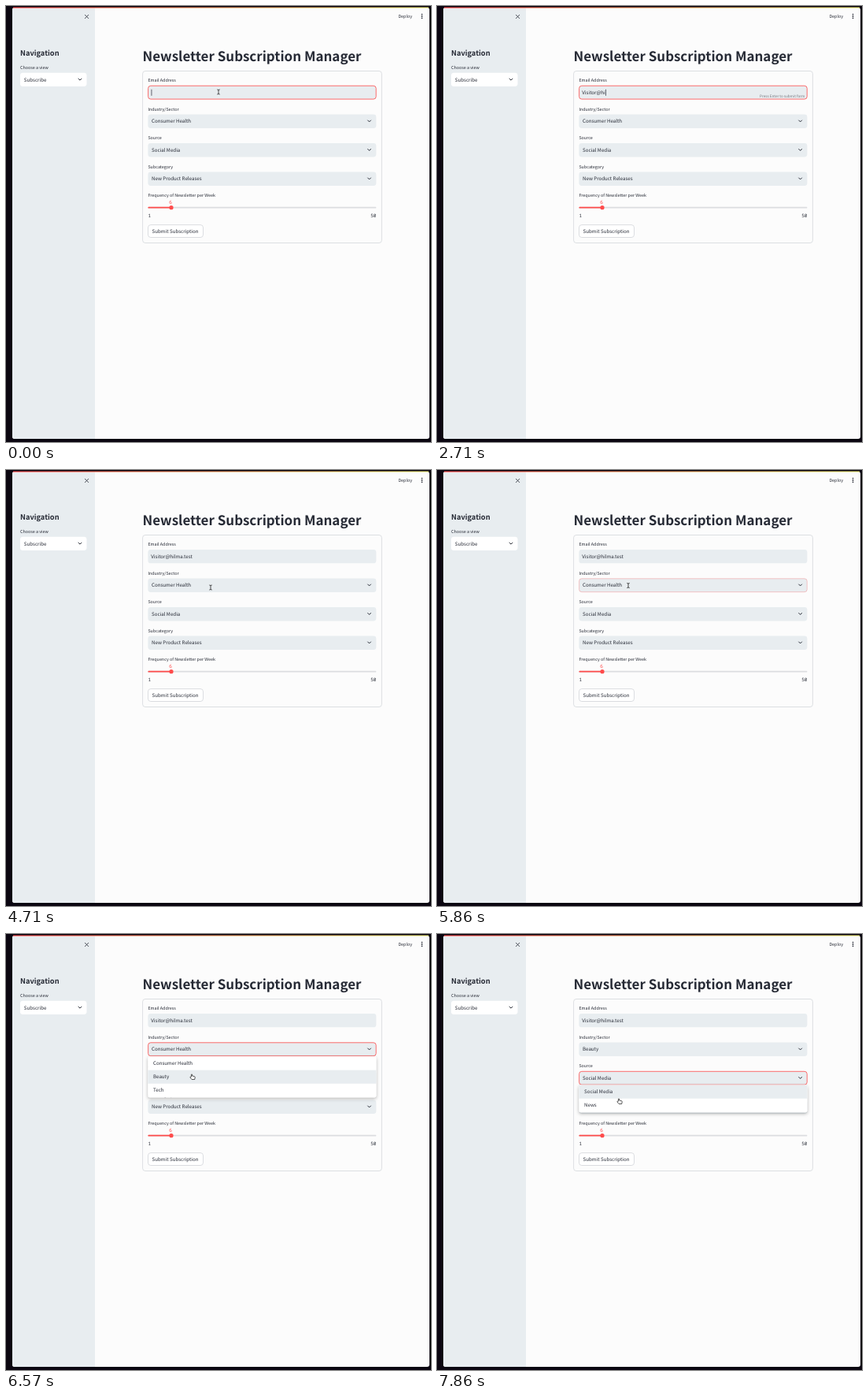
Write an HTML page that moves like this. It is 540 px wide and 553 px high and loops after 8 s.

```html
<!DOCTYPE html>
<html lang="en">
<head>
<meta charset="utf-8">
<title>Newsletter Subscription Manager</title>
<style>
  html, body { margin: 0; width: 100%; height: 100%; overflow: hidden; background: #0b0611; }
  svg { display: block; width: 540px; height: 553px; }
  text {
    font-family: "Noto Sans CJK JP", "Noto Sans CJK SC", "Noto Sans", sans-serif;
    text-rendering: geometricPrecision; white-space: pre;
  }
  .mono { font-family: "Noto Sans Mono", "DejaVu Sans Mono", monospace; }
</style>
</head>
<body>
<svg id="stage" viewBox="0 0 540 553">
  <defs>
    <linearGradient id="strip"><stop stop-color="#ff4b4b"/><stop offset="1" stop-color="#fffd80"/></linearGradient>
    <filter id="shadow" x="-5%" y="-20%" width="110%" height="150%">
      <feDropShadow dx="0" dy="1.7" stdDeviation="2" flood-opacity=".3"/>
    </filter>
  </defs>
  <g id="page"></g>
  <g id="live"></g>
</svg>
<script>
const INK = '#262a35', GREY = '#e8edf0', PAPER = '#fcfcfc', RED = '#ff4b4b';
const BODY = 6.18, LABEL = 5.4;
const LEFT = 180.4, WIDTH = 290, ROW = 17.3;
const TICKS_PER_SECOND = 7, LOOP_TICKS = 56;

const address = 'Visitor@hilma.test';
// tick at which each character is typed
const keyTicks = [2, 4, 5, 7, 8, 9, 11, 15, 17, 19, 22, 24, 26, 28, 29, 29, 30, 30];
// pointer path: tick, x, y
const path = [[32, 266, 122], [33, 260, 149], [35, 255, 149], [41, 243, 146.5], [42, 243, 148],
  [44, 240, 168], [46, 237, 181], [51, 234, 181.5], [52, 234, 183], [55, 232, 212]];

const text = (s, x, y, size = BODY, extra = '') =>
  `<text x="${x}" y="${y}" font-size="${size}" fill="${INK}" ${extra}>${s}</text>`;
const box = (x, y, w, h, fill, r = 0, extra = '') =>
  `<rect x="${x}" y="${y}" width="${w}" height="${h}" rx="${r}" fill="${fill}" ${extra}/>`;
const line = (d, width, color = INK) =>
  `<path d="${d}" fill="none" stroke="${color}" stroke-width="${width}" stroke-linecap="round" stroke-linejoin="round"/>`;
const chevron = (x, y) => line(`M${x - 1.9} ${y - 1}l1.9 1.9 1.9-1.9`, 1);
const field = y => box(LEFT, y, WIDTH, ROW, GREY, 3.4);
const outline = (y, opacity) =>
  box(LEFT + .2, y + .2, WIDTH - .4, ROW - .4, 'none', 3.3, `stroke="${RED}" stroke-width=".8" opacity="${opacity}"`);
const select = (y, value) => field(y) + text(value, 185, y + 10.7) + chevron(461.6, y + 8.4);

function menu(y, items, active) {
  const rows = items.map((item, i) => {
    const top = y + .2 + i * 17.25;
    return (i === active ? box(LEFT, top, WIDTH, 17.1, GREY) : '') + text(item, 187, top + 10.3);
  });
  return box(LEFT, y, WIDTH, items.length * 17.25 + .3, '#fff', 2.5, 'filter="url(#shadow)"') + rows.join('');
}

const beam = (x, y) => line(`M${x - 1.3} ${y - 3}q1.3 0 1.3 .9 0-.9 1.3-.9M${x} ${y - 2.1}v4.2
  M${x - 1.3} ${y + 3}q1.3 0 1.3-.9 0 .9 1.3 .9`, .8, '#222');
const hand = (x, y) => `<path transform="translate(${x} ${y})" fill="#fff" stroke="#222" stroke-width=".75"
  stroke-linejoin="round" d="M-1.6 .2V-2.8q.6-1 1.2 0V-1l2.8.6q.9.3.8 1.3l-.5 2.6h-3.6L-3.1.9q0-1 .9-.7z"/>`;

function staticPage() {
  const labels = [['Email Address', 96], ['Industry/Sector', 132.6], ['Source', 169.1],
    ['Subcategory', 205.6], ['Frequency of Newsletter per Week', 242]];
  return box(0, 0, 540, 553, '#0b0611') +
    box(8, 2, 530, 547, PAPER, 3) +
    `<path d="M11 2H113V549H11q-3 0-3-3V5q0-3 3-3z" fill="${GREY}"/>` +
    box(9, 1.6, 528, 1.1, 'url(#strip)') +
    line('M100.4 11.3l4.4 4.4M104.8 11.3l-4.4 4.4', .8) +
    text('Navigation', 18, 62.8, 9.26, 'font-weight="700"') +
    text('Choose a view', 18, 79.7, LABEL) +
    box(18, 84.7, 84.5, ROW, '#fff', 3.4) + text('Subscribe', 22.8, 95.5) + chevron(94, 93.2) +
    text('Deploy', 498.4, 15, LABEL) +
    [10.5, 12.9, 15.3].map(y => `<circle cx="528.5" cy="${y}" r=".85" fill="${INK}"/>`).join('') +
    text('Newsletter Subscription Manager', 173.5, 70.4, 16.98, 'font-weight="700"') +
    box(173.6, 82.5, 303.8, 218, 'none', 3.4, 'stroke="#d5d8dc" stroke-width=".8"') +
    labels.map(([s, y]) => text(s, LEFT, y, LABEL)).join('') +
    field(101) + select(210.6, 'New Product Releases') +
    box(LEFT, 254.8, WIDTH, 1.8, '#dcdde0', .9) + box(LEFT, 254.8, 29.6, 1.8, RED, .9) +
    `<circle cx="210" cy="255.7" r="2.6" fill="${RED}"/>` +
    text('6', 209, 250.7, 6, `class="mono" text-anchor="middle" style="fill:${RED}"`) +
    text('1', LEFT, 268, 6, 'class="mono"') +
    text('50', 470.4, 268, 6, 'class="mono" text-anchor="end"') +
    box(180.5, 277.6, 70, 15.9, '#fff', 3.4, 'stroke="#d2d5da" stroke-width=".8"') +
    text('Submit Subscription', 185.6, 287.8);
}

function pointerAt(tick) {
  const i = path.findIndex(p => p[0] >= tick);
  const [t1, x1, y1] = path[i], [t0, x0, y0] = path[Math.max(i - 1, 0)];
  const k = t1 > t0 ? (tick - t0) / (t1 - t0) : 0;
  return [x0 + (x1 - x0) * k, y0 + (y1 - y0) * k];
}

function emailField(tick) {
  const count = keyTicks.filter(t => t <= tick).length;
  const lastKey = count ? keyTicks[count - 1] : 0;
  const focused = tick < 33;
  const caretOn = focused && (tick - lastKey) % 7 < 4;
  const caret = caretOn ? `<tspan id="caret"> </tspan>` : '';
  return (focused ? outline(101, 1) : '') +
    text(address.slice(0, count) + caret, 184.3, 111.7) +
    (focused && count ? text('Press Enter to submit form', 467.3, 115.9, 4.63, 'text-anchor="end" opacity=".62"') : '');
}

function render(tick) {
  const industryOpen = tick >= 42 && tick < 47, sourceOpen = tick >= 52;
  const industryGlow = tick < 41 || tick > 51 ? 0 : tick === 41 || tick === 51 ? .35 : 1;
  let out = emailField(tick) +
    select(137.6, tick < 47 ? 'Consumer Health' : 'Beauty') + outline(137.6, industryGlow) +
    select(174.1, 'Social Media') + outline(174.1, sourceOpen ? 1 : 0);
  if (industryOpen) out += menu(155.2, ['Consumer Health', 'Beauty', 'Tech'], tick < 45 ? 0 : 1);
  if (sourceOpen) out += menu(191.4, ['Social Media', 'News'], 0);

  if (tick < 2) out += beam(270, 109);
  if (tick >= 32) {
    const [x, y] = pointerAt(tick);
    const overMenu = industryOpen && y > 155 || sourceOpen && y > 191;
    out += (overMenu ? hand : beam)(x, y);
  }
  live.innerHTML = out;

  const caret = document.getElementById('caret');
  if (caret) {
    const x = caret.getStartPositionOfChar(0).x + .3;
    caret.remove();
    live.insertAdjacentHTML('beforeend', box(x, 105.8, .7, 8, INK));
  }
}

const live = document.getElementById('live');
document.getElementById('page').innerHTML = staticPage();
let shown = -1;
function frame() {
  // small lead keeps each tick ahead of its rounded time
  const tick = Math.floor((performance.now() + 4) / 1000 * TICKS_PER_SECOND) % LOOP_TICKS;
  if (tick !== shown) render(shown = tick);
  requestAnimationFrame(frame);
}
frame();
</script>
</body>
</html>
```
